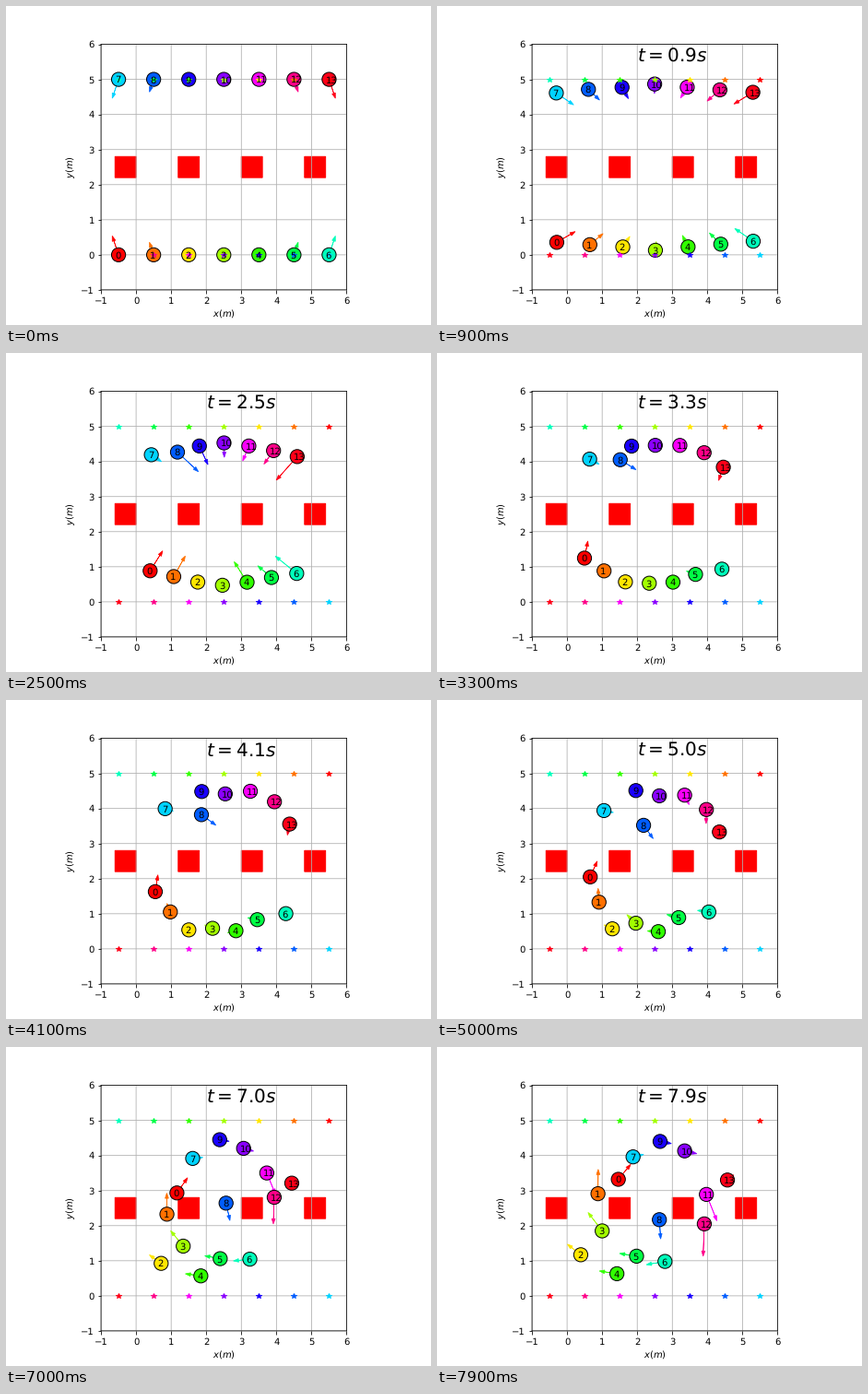
Recreate the animation shown at these times as a matplotlib script. Size 461 px wide and 346 px high, loop 8 s.

```python
import numpy as np
import matplotlib.pyplot as plt
from matplotlib.animation import FuncAnimation
from matplotlib.patches import Circle, FancyArrow, Rectangle

FRAMES, STEP = 80, 0.1
PER_ROW, N = 7, 14
RADIUS = 0.2
KEY_T = np.array([0, 2.1, 5.0, 7.9])
EPS = 1e-3

# Where each robot passes at 5.0 s and where it is at 7.9 s
ROUTES = [
    [(0.66, 2.05), (1.46, 3.32)],
    [(0.91, 1.33), (0.88, 2.91)],
    [(1.29, 0.57), (0.39, 1.17)],
    [(1.96, 0.73), (1.00, 1.85)],
    [(2.60, 0.49), (1.42, 0.63)],
    [(3.18, 0.89), (1.98, 1.13)],
    [(4.04, 1.05), (2.79, 0.98)],
    [(1.05, 3.94), (1.88, 3.96)],
    [(2.18, 3.52), (2.63, 2.17)],
    [(1.96, 4.51), (2.65, 4.40)],
    [(2.63, 4.36), (3.35, 4.13)],
    [(3.35, 4.38), (3.97, 2.89)],
    [(3.97, 3.97), (3.91, 2.05)],
    [(4.34, 3.33), (4.57, 3.30)],
]

plt.rcParams.update({"font.family": "DejaVu Sans",
                     "path.snap": False, "text.hinting": "none"})
fig, ax = plt.subplots(figsize=(6.4028, 4.80556), dpi=72)
ax.set_aspect("equal")
ax.set(xlim=(-1, 6), ylim=(-1, 6), xticks=range(-1, 7), yticks=range(-1, 7))
ax.set_xlabel("$x(m)$", labelpad=2)
ax.set_ylabel("$y(m)$")
ax.grid(True)

for left in (-0.6, 1.2, 3.0, 4.8):
    ax.add_patch(Rectangle((left, 2.2), 0.6, 0.6, color="r"))

colors = plt.cm.hsv(np.linspace(0, 1, N))
phases = np.random.default_rng(4).uniform(0, 2 * np.pi, N)
clock = ax.text(2, 5.5, "", fontsize=20)


def home(i):
    return np.array([i % PER_ROW - 0.5, 5.0 * (i // PER_ROW)])


class Robot:
    def __init__(self, i):
        x, y = home(i)
        self.goal = home(N - 1 - i)
        self.phase = phases[i]

        # Both rows first draw in towards the middle
        off, inward = x - 2.5, 1 if y == 0 else -1
        gather = 2.5 + 0.73 * off, y + inward * (0.42 + 0.1 * abs(off))
        self.pts = np.array([(x, y), gather, *ROUTES[i]])
        self.slopes = np.gradient(self.pts, KEY_T, axis=0, edge_order=2)
        self.slopes[0] = 0.06 * off, inward * 0.18 * abs(off)

        ax.plot(*self.goal, "*", color=colors[i], zorder=2.1)
        self.arrow = ax.add_patch(FancyArrow(
            0, 0, 1, 0, width=0.001, head_width=0.1, head_length=0.15,
            length_includes_head=True, color=colors[i], lw=0.7, zorder=1.8))
        self.body = ax.add_patch(Circle(
            (0, 0), RADIUS, fc=colors[i], ec="k", lw=1, zorder=2))
        self.label = ax.text(0, 0, str(i), fontsize=10, zorder=3)

    def at(self, t):
        """Cubic Hermite curve through the key points."""
        k = np.clip(np.searchsorted(KEY_T, t, side="right") - 1, 0, 2)
        h = KEY_T[k + 1] - KEY_T[k]
        s = (t - KEY_T[k]) / h
        ease = s * s * (3 - 2 * s)
        return ((1 - ease) * self.pts[k] + ease * self.pts[k + 1]
                + h * s * (1 - s) * ((1 - s) * self.slopes[k]
                                     - s * self.slopes[k + 1]))

    def heading(self, t):
        """Velocity, plus a wavering push to the goal while waiting."""
        velocity = (self.at(t + EPS) - self.at(t - EPS)) / (2 * EPS)
        to_goal = self.goal - self.at(t)
        to_goal /= np.hypot(*to_goal)
        waiting = np.exp(-((t - 2.1) / 0.7) ** 2)
        return velocity + 0.4 * waiting * (1 + np.sin(4 * t + self.phase)) * to_goal

    def move(self, t):
        x, y = self.at(t)
        dx, dy = self.heading(t)
        self.body.center = x, y
        self.label.set_position((x - 0.1, y - 0.1))
        self.arrow.set_data(x=x, y=y, dx=dx, dy=dy)


robots = [Robot(i) for i in range(N)]


def update(k):
    t = k * STEP
    clock.set_text(f"$t={t:.1f}s$" if k else "")
    for robot in robots:
        robot.move(t)
    return []


anim = FuncAnimation(fig, update, frames=FRAMES, interval=100,
                     repeat=True, repeat_delay=0, blit=False)
plt.show()
```
